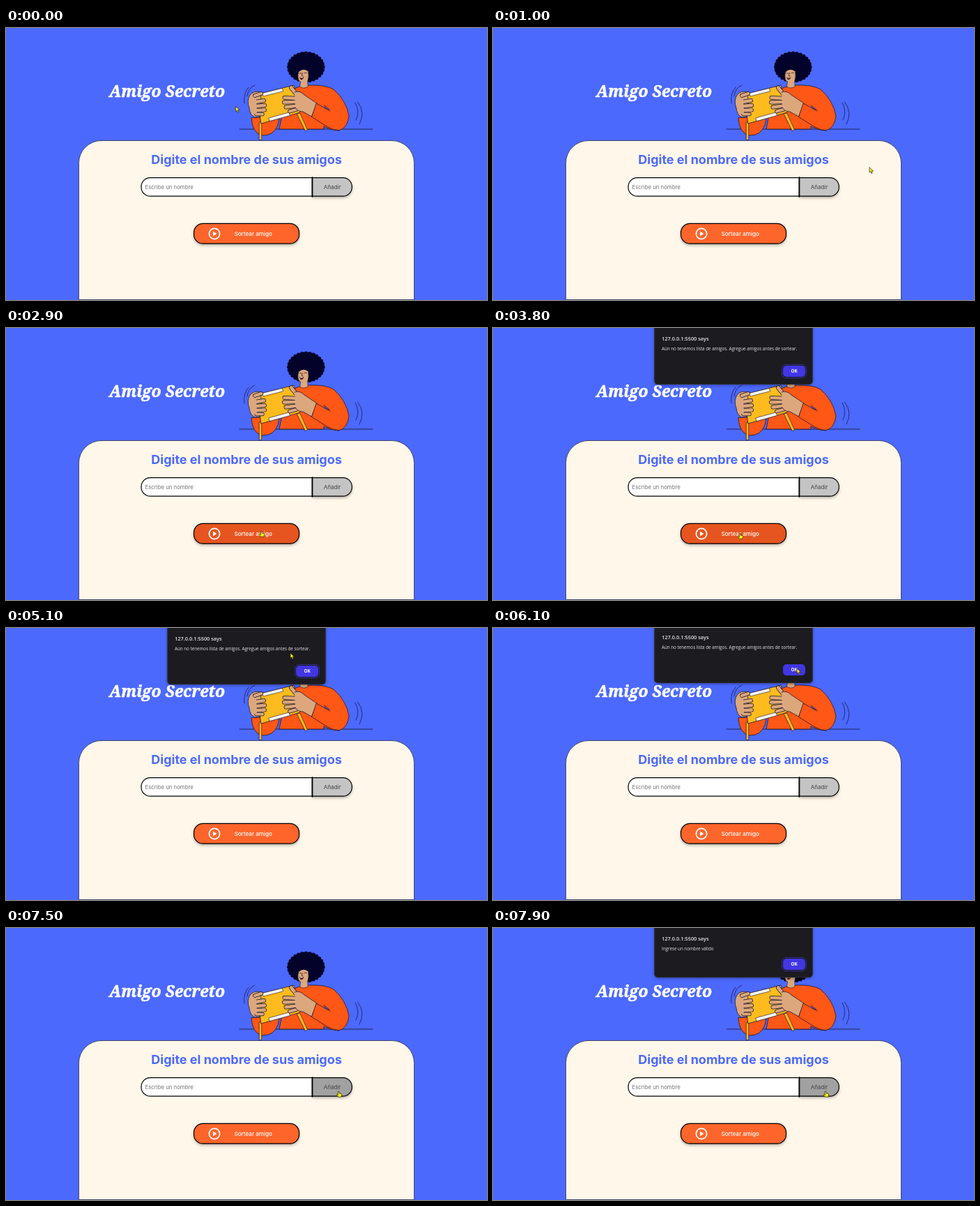
Animation, 690 px wide and 390 px high, one loop 8000 ms. Source, as an HTML page with a canvas:

```html
<!DOCTYPE html>
<html lang="es">
<head>
<meta charset="utf-8">
<title>Amigo Secreto</title>
<style>
html, body { margin: 0; width: 100%; height: 100%; overflow: hidden; background: #4b69fd; }
canvas { display: block; width: 690px; height: 390px; }
</style>
</head>
<body>
<canvas id="stage" width="690" height="390"></canvas>
<script>
const ctx = document.getElementById('stage').getContext('2d');
const LOOP = 8000, STEP = 100;
const BLUE = '#4b69fd', INK = '#14142e', ORANGE = '#fe5716', SKIN = '#dca77c', YELLOW = '#fdbb1d';
const SANS = 'Inter, sans-serif', SYSTEM = '"Open Sans", sans-serif';

// Pointer tip: time, x, y
const route = [
  [0, 329.5, 112.5], [200, 300, 92], [400, 276, 190], [600, 400, 262], [800, 572, 262],
  [1000, 540, 200], [1400, 420, 256], [1800, 323, 244], [2300, 300, 200], [2700, 345, 268],
  [2900, 366, 291], [3200, 354, 294], [3800, 354, 294], [4000, 330, 262], [4200, 262, 176],
  [4500, 258, 90], [4700, 264, 30], [5100, 408, 36], [5500, 436, 58], [6700, 436, 58],
  [6900, 300, 180], [7000, 258, 264], [7150, 380, 258], [7300, 477, 234], [LOOP, 477, 234]
];

const dialogs = [
  { open: 3400, press: 5900, leave: 6100, gone: 6200, bottom: 81,
    text: 'Aún no tenemos lista de amigos. Agregue amigos antes de sortear.' },
  { open: 7800, press: LOOP, leave: LOOP, gone: LOOP, bottom: 71, text: 'Ingrese un nombre válido' }
];

function pointerAt(t) {
  let i = 1;
  while (i < route.length - 1 && route[i][0] < t) i++;
  const [t0, x0, y0] = route[i - 1], [t1, x1, y1] = route[i];
  const p = (t - t0) / (t1 - t0), e = p * p * (3 - 2 * p);
  return { x: x0 + (x1 - x0) * e, y: y0 + (y1 - y0) * e };
}

function shape(path, fill, stroke, width = 0.75) {
  const p = typeof path === 'string' ? new Path2D(path) : path;
  if (fill) { ctx.fillStyle = fill; ctx.fill(p); }
  if (stroke) { ctx.strokeStyle = stroke; ctx.lineWidth = width; ctx.stroke(p); }
}

function box(x, y, w, h, radii) {
  const p = new Path2D();
  p.roundRect(x, y, w, h, radii);
  return p;
}

function label(text, x, y, font, color, align = 'left') {
  ctx.font = font;
  ctx.fillStyle = color;
  ctx.textAlign = align;
  ctx.fillText(text, x, y);
}

function withShadow(color, blur, dy, draw) {
  ctx.save();
  ctx.shadowColor = color;
  ctx.shadowBlur = blur;
  ctx.shadowOffsetY = dy;
  draw();
  ctx.restore();
}

function finger(x0, y0, x1, y1, w) {
  ctx.lineCap = 'round';
  for (const [color, width] of [[INK, w + 1.3], [SKIN, w]]) {
    ctx.strokeStyle = color;
    ctx.lineWidth = width;
    ctx.beginPath();
    ctx.moveTo(x0, y0);
    ctx.lineTo(x1, y1);
    ctx.stroke();
  }
}

function drawTitle() {
  label('Amigo Secreto', 231, 99, 'italic bold 22.8px "Noto Serif", serif', '#fff', 'center');
  ctx.strokeStyle = '#fff';
  ctx.lineWidth = 0.6;
  ctx.strokeText('Amigo Secreto', 231, 99);
}

function drawHead() {
  const hair = new Path2D();
  hair.ellipse(430.3, 56, 25.5, 20.8, 0, 0, 7);
  for (let i = 0; i < 28; i++) {
    const a = i * Math.PI / 14;
    const x = 430.3 + 24.2 * Math.cos(a), y = 56 + 19.4 * Math.sin(a);
    hair.moveTo(x + 3, y);
    hair.arc(x, y, 3, 0, 7);
  }
  shape(hair, '#02022a');
  shape('M420.5 58Q427 54 433.5 58L434 70L432.6 77L433.2 84Q427 88 421.5 84L422.6 77Q418.6 76 418.8 68Z', SKIN, INK, 0.6);
  shape('M418.5 59Q427 51 436 58L433 62Q426 57 420 63Z', '#02022a');
  shape('M420.8 65Q422.3 64 423.8 65M428 64.5Q429.7 63.5 431.4 64.5M425.4 64.5L424.2 68.3L426 68.8', null, INK, 0.75);
  shape('M421 70.3Q424.5 71.5 427.3 70Q426.5 74.2 423.2 74Q421.5 73 421 70.3Z', '#3b0d18');
  shape('M422.5 71.3L425.8 71', null, '#fff', 0.8);
}

function drawWoman() {
  shape('M335 145H526', null, INK, 0.8);
  shape('M413 87Q423 82 435 82Q458 81 470 88Q488 104 492 126Q490 144 477 147Q466 147 456 141L456 145H392L397 119Z', ORANGE, INK);
  drawHead();
  shape('M352 129Q353 150 367 154Q384 155 390 139L394 120L365 128Z', ORANGE, INK);
  shape('M363.5 135H366.7V160.5H363.5ZM417.5 123L421.5 122L432.5 146L429.5 147.5Z', YELLOW, INK, 0.6);
  shape('M361.5 95L413 82L422 121L366 137Z', YELLOW, INK);
  shape('M367.5 93.5L396 86.4L397.8 90.7L369.5 97.8Z', '#fffaf5', INK, 0.6);
  shape('M377 129L406 121L407.5 125.5L378.5 133.5Z', '#fffaf5', INK, 0.6);

  shape('M365 92Q356 89 350 96Q345 104 349 115Q350 125 357 128Q363 128 367 124L366 105Z', SKIN, INK);
  finger(357, 97, 366, 94, 4.4);
  finger(358, 106, 370, 104, 4.6);
  finger(358, 112, 371, 111, 4.6);
  finger(359, 118, 371, 117.5, 4.4);
  finger(359, 123.5, 368, 123.5, 4);
  shape('M352 97Q348 110 354 122Q357 125 360 121L359 102Z', SKIN);

  finger(419, 98, 409, 85.5, 4.8);
  finger(419, 101, 399.5, 100, 4.6);
  finger(419, 106, 399, 106.5, 4.6);
  finger(421, 111, 401.5, 113.5, 4.6);
  finger(423, 115, 407, 119.5, 4.4);
  shape('M414 92Q421 89 428 96L446 108L438.5 127L426 120Q418 120 415 114', SKIN, INK);
  shape('M445 108L473 124L478 146Q468 146 438.5 127.5Z', ORANGE);
  shape('M465 119L445 108L438.5 127.5L460 141Q470 147 478 147', null, INK);
  shape('M456.5 111L464 117L458.5 115.5Z', '#4555d4', INK, 0.5);

  shape('M348 85Q340 94 342 108M357 82Q347 86 346 98M501 107Q508 120 502 132M504.5 106Q516 121 507 138', null, INK, 0.7);
}

function drawPage(overAdd, overDraw) {
  ctx.fillStyle = BLUE;
  ctx.fillRect(0, 0, 690, 390);
  drawTitle();
  drawWoman();
  shape(box(104.5, 161.5, 481, 228, [32, 32, 0, 0]), '#fff7ea', '#2a2d4c', 0.8);
  label('Digite el nombre de sus amigos', 345, 194.5, '700 18px ' + SANS, BLUE, 'center');

  shape(box(194, 214.6, 246, 26.6, [13, 0, 0, 13]), '#fff', '#000', 1.2);
  label('Escribe un nombre', 199.5, 230.6, '7.8px ' + SANS, '#757575');

  const add = box(439.5, 214.6, 56.8, 26.6, [0, 13, 13, 0]);
  withShadow('rgba(0,0,0,.35)', 4, 2, () => shape(add, overAdd ? '#a1a1a1' : '#c4c4c4'));
  shape(add, null, '#000', 1.2);
  shape('M439.4 214V242', null, '#000', 1.7);
  label('Añadir', 468, 231, '8px ' + SANS, '#444', 'center');

  const draw = box(269.5, 280.4, 151, 28.8, 13);
  withShadow('rgba(0,0,0,.35)', 4, 2, () => shape(draw, overDraw ? '#e65520' : '#fe652b'));
  shape(draw, null, '#000', 1.2);
  shape('M306.6 295A7.6 7.6 0 1 1 291.4 295A7.6 7.6 0 1 1 306.6 295Z', null, '#fff', 1.7);
  shape('M297 291.4L302.4 295L297 298.6Z', '#fff');
  label('Sortear amigo', 354.7, 298, '500 8.1px ' + SANS, '#fff', 'center');
}

function drawDialog(d, t) {
  ctx.save();
  if (t < d.open + STEP) {
    ctx.globalAlpha = 0.7;
    ctx.translate(0, -4);
  } else if (t >= d.leave) {
    ctx.translate(0, -2);
  }
  withShadow('rgba(0,0,0,.4)', 4, 1, () => shape(box(231.5, -12, 227, d.bottom + 12, 5), '#1b1b20'));
  shape(box(231.8, -12, 226.4, d.bottom + 11.6, 5), null, '#34343c', 0.7);
  label('127.0.0.1:5500 says', 242, 17.7, '600 7.4px ' + SYSTEM, '#e6e6ea');
  label(d.text, 242, 32.3, '6.25px ' + SYSTEM, '#e2e2e6');
  const mid = d.bottom - 19;
  if (t < d.press) shape(box(414.4, mid - 9.6, 35.2, 19.2, 6), null, '#35309a', 1);
  shape(box(416, mid - 8, 32, 16, 5), '#4236e3');
  label('OK', 432, mid + 2.3, '700 6.3px ' + SYSTEM, '#fff', 'center');
  ctx.restore();
}

function drawPointer(p, isHand) {
  ctx.save();
  ctx.translate(p.x, p.y);
  ctx.scale(0.88, 0.88);
  ctx.lineJoin = 'round';
  const path = isHand
    ? 'M-.9 .6Q0-.4 1 .6V3.4L4.6 4.2Q5.5 4.6 5.2 6L4.4 9.4H-.4L-3 6.2Q-3 4.8-1.8 5.2L-.9 6Z'
    : 'M0 0V8.2L1.9 6.5L3.3 9.7L4.8 9L3.4 5.9H5.9Z';
  shape(path, '#ffee12', '#2c2a10', 0.8);
  ctx.restore();
}

const inside = (p, x, y, w, h) => p.x >= x && p.x <= x + w && p.y >= y && p.y <= y + h;

function render(t) {
  const p = pointerAt(t);
  const overAdd = inside(p, 439, 214, 57, 28);
  const overDraw = inside(p, 269, 280, 152, 30);
  drawPage(overAdd, overDraw);
  for (const d of dialogs) if (t >= d.open && t < d.gone) drawDialog(d, t);
  drawPointer(p, overAdd || overDraw);
}

const start = performance.now();
function tick() {
  const t = (performance.now() - start) % LOOP;
  render(Math.floor(t / STEP) * STEP);
  requestAnimationFrame(tick);
}
tick();
</script>
</body>
</html>
```
